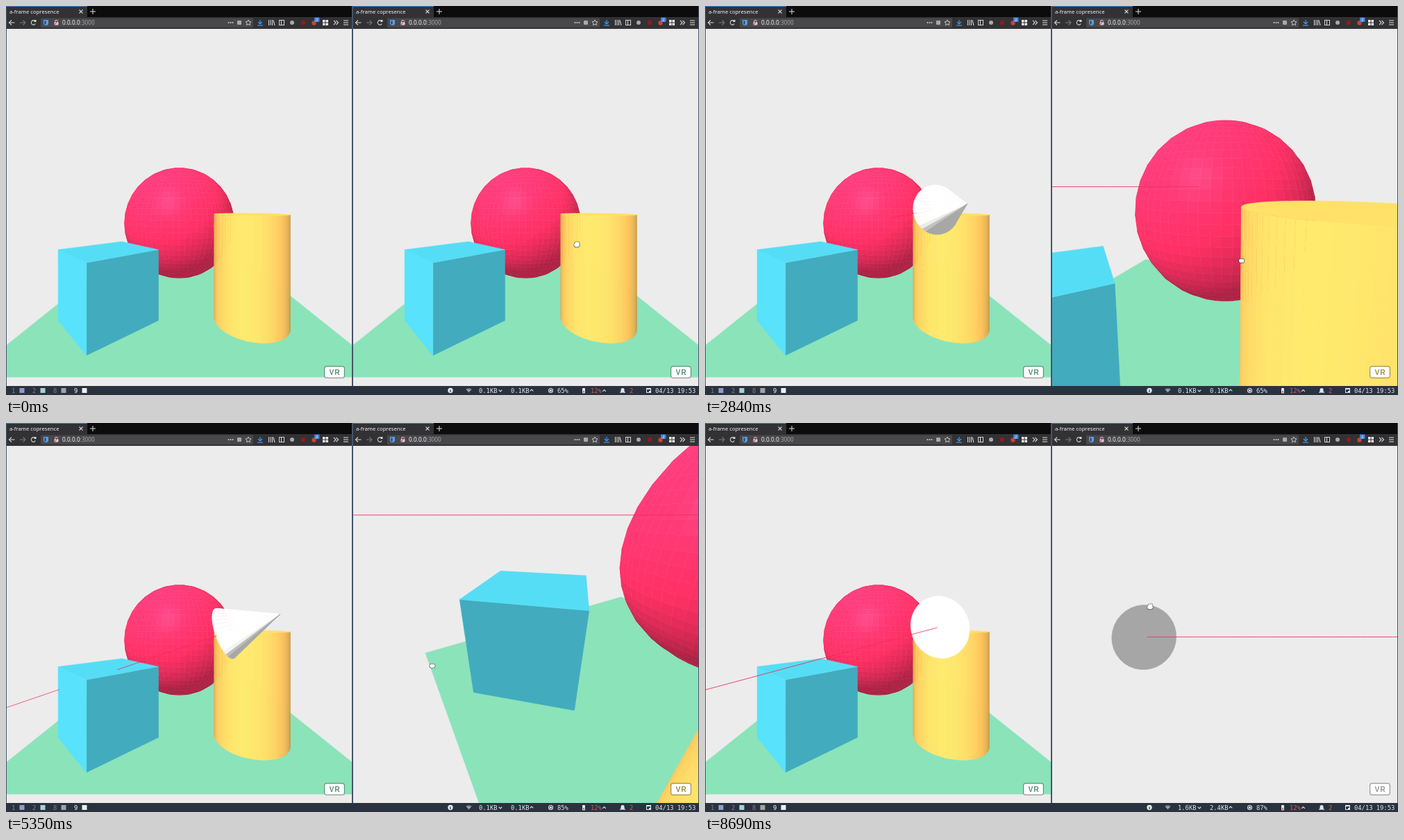
Write an HTML page with a canvas that moves like this. It is 998x561 px and loops after 9.57 s.

```html
<!DOCTYPE html>
<html lang="en">
<head>
<meta charset="utf-8">
<title>a-frame copresence</title>
<style>
html, body { margin: 0; width: 100%; height: 100%; overflow: hidden; background: #0c0c0d; }
canvas { display: block; }
</style>
</head>
<body>
<canvas id="stage" width="998" height="561"></canvas>
<script>
const LOOP = 9570, FOCAL = 306.4, NEAR = 0.05, MID_Y = 290.1, EYE_Y = 1.6;
const stage = document.getElementById('stage').getContext('2d');
let g = stage;

// ---------- vectors ----------
const add = (a, b, k = 1) => a.map((v, i) => v + b[i] * k);
const mix = (a, b, k) => a.map((v, i) => v + (b[i] - v) * k);
const dot = (a, b) => a[0] * b[0] + a[1] * b[1] + a[2] * b[2];
const cross = (a, b) => [a[1] * b[2] - a[2] * b[1], a[2] * b[0] - a[0] * b[2], a[0] * b[1] - a[1] * b[0]];
const unit = a => { const n = Math.hypot(...a); return a.map(v => v / n); };
const rad = d => d * Math.PI / 180;
const LIGHT = unit([-0.5, 1, 1]), UP = [0, 1, 0], TURN = Math.PI * 2;

// ---------- camera ----------
function camera(midX, x, z, yaw, pitch) {
  return { midX, eye: [x, EYE_Y, z], s: Math.sin(rad(yaw)), c: Math.cos(rad(yaw)),
           sp: Math.sin(rad(pitch)), cp: Math.cos(rad(pitch)) };
}
function toCamera(cam, p) {
  const [x, y, z] = add(p, cam.eye, -1), ahead = -x * cam.s - z * cam.c;
  return [x * cam.c - z * cam.s, y * cam.cp + ahead * cam.sp, ahead * cam.cp - y * cam.sp];
}
const toScreen = (cam, [x, y, z]) => [cam.midX + FOCAL * x / z, MID_Y - FOCAL * y / z];

function clipNear(pts) {
  const out = [];
  pts.forEach((a, i) => {
    const b = pts[(i + 1) % pts.length];
    if (a[2] >= NEAR) out.push(a);
    if ((a[2] >= NEAR) !== (b[2] >= NEAR)) out.push(mix(a, b, (NEAR - a[2]) / (b[2] - a[2])));
  });
  return out;
}
function face(cam, pts, normal, { rgb, diffuse = 0.6, gloss = 0 }) {
  const view = add(cam.eye, pts[0], -1);
  if (dot(view, normal) <= 0) return;
  const shape = clipNear(pts.map(p => toCamera(cam, p)));
  if (shape.length < 3) return;
  const lit = 0.733 + diffuse * Math.max(0, dot(normal, LIGHT));
  const shine = gloss && gloss * Math.max(0, dot(normal, unit(add(LIGHT, unit(view))))) ** 40;
  g.fillStyle = g.strokeStyle = `rgb(${rgb.map(v => Math.min(255, Math.round(v * lit + shine)))})`;
  g.lineWidth = 0.5;
  g.beginPath();
  shape.forEach(p => g.lineTo(...toScreen(cam, p)));
  g.closePath();
  g.fill();
  g.stroke();
}

// ---------- scene ----------
const GREEN = { rgb: [123, 200, 164] }, TEAL = { rgb: [76, 195, 217] }, AMBER = { rgb: [255, 198, 93] };
const PINK = { rgb: [239, 45, 94], gloss: 18 }, WHITE = { rgb: [226, 226, 228], diffuse: 1.6 };
const BALL = [0, 1.25, -5], BALL_R = 1.25;
const around = (n, fn) => Array.from({ length: n }, (_, i) => fn(i / n * TURN, (i + 1) / n * TURN));

// A coarse globe of 36 by 18 cells; each cell is split in four for smoother shading.
const globe = (i, j) => {
  const u = rad(i * 10), v = rad(j * 10);
  return [Math.sin(v) * Math.cos(u), Math.cos(v), Math.sin(v) * Math.sin(u)];
};
function facet(u, v) {
  const i = Math.floor(u), j = Math.floor(v);
  return mix(mix(globe(i, j), globe(i + 1, j), u - i), mix(globe(i, j + 1), globe(i + 1, j + 1), u - i), v - j);
}
const ballFaces = [];
for (let v = 0; v < 18; v += 0.5)
  for (let u = 0; u < 36; u += 0.5) {
    const quad = [facet(u, v), facet(u + 0.5, v), facet(u + 0.5, v + 0.5), facet(u, v + 0.5)];
    ballFaces.push([quad.map(p => add(BALL, p, BALL_R)), globe(u + 0.25, v + 0.25)]);
  }

// Upright prism with a flat lid: a box for four sides, a cylinder for many.
function prism(cam, sides, x, z, r, height, paint) {
  const rim = (a, y) => [x + r * Math.cos(a), y, z + r * Math.sin(a)];
  around(sides, (a, b) => {
    const m = (a + b) / 2;
    face(cam, [rim(a, height), rim(b, height), rim(b, 0), rim(a, 0)], [Math.cos(m), 0, Math.sin(m)], paint);
  });
  face(cam, around(sides, a => rim(a, height)), UP, paint);
}
function drawScene(cam) {
  g.fillStyle = '#ececec';
  g.fillRect(cam.midX - 250, 33, 500, 515);
  face(cam, [[-2, 0, -2], [2, 0, -2], [2, 0, -6], [-2, 0, -6]], UP, GREEN);
  ballFaces.forEach(([quad, normal]) => face(cam, quad, normal, PINK));
  prism(cam, 4, -1, -3, Math.SQRT1_2, 1, TEAL);
  prism(cam, 90, 1, -3, 0.5, 1.5, AMBER);
}

// ---------- avatar: a cone whose base faces the gaze, plus a laser ----------
const avatar = (x, z, dir) => ({ pos: [x, EYE_Y, z], dir: unit(dir) });

function drawCone(cam, { pos, dir }) {
  const e1 = unit(cross(dir, UP)), e2 = cross(e1, dir);
  const base = add(pos, dir, 0.25), apex = add(pos, dir, -0.25);
  const spoke = a => add(e1.map(v => v * Math.cos(a)), e2, Math.sin(a));
  const rim = a => add(base, spoke(a), 0.25);
  around(36, (a, b) => face(cam, [apex, rim(a), rim(b)], unit(add(spoke((a + b) / 2), dir, -0.5)), WHITE));
  face(cam, around(36, rim), dir, WHITE);
}
function insideSolid(p, cone) {
  const [x, y, z] = p, dz = z + 3;
  if (y < 0) return Math.abs(x) < 2 && z < -2 && z > -6;
  if (y < 1 && Math.abs(x + 1) + Math.abs(dz) < Math.SQRT1_2) return true;
  if (y < 1.5 && Math.hypot(x - 1, dz) < 0.5) return true;
  if (Math.hypot(...add(p, BALL, -1)) < BALL_R) return true;
  const w = add(p, add(cone.pos, cone.dir, -0.25), -1), s = dot(w, cone.dir);
  return s > 0 && s < 0.495 && dot(w, w) - s * s < s * s / 4;
}
function hidden(cam, p, cone) {
  for (let i = 1; i <= 60; i++) if (insideSolid(mix(cam.eye, p, i / 60), cone)) return true;
  return false;
}
function drawLaser(cam, user) {
  g.strokeStyle = '#ec2f56';
  g.lineWidth = 0.9;
  g.beginPath();
  let last = null;
  for (let i = 0; i <= 400; i++) {
    const p = add(user.pos, user.dir, 0.25 + 5.25 * i / 400), c = toCamera(cam, p);
    const q = c[2] > NEAR && toScreen(cam, c);
    const now = q && Math.abs(q[0] - cam.midX) < 600 && !hidden(cam, p, user) ? q : null;
    if (last && now) { g.moveTo(...last); g.lineTo(...now); }
    last = now;
  }
  g.stroke();
}

// ---------- motion ----------
// Distance covered while a key is held: speed eases in and out with a 50 ms time constant.
const ramp = u => u > 0 ? u - 0.05 * (1 - Math.exp(-u / 0.05)) : 0;
const walk = (t, press, hold) => 3.25 * (ramp((t - press) / 1000) - ramp((t - press) / 1000 - hold));
const place = t => [walk(t, 1365, 0.196), -walk(t, 890, 0.404) - walk(t, 2010, 0.178)];

// Looking around is a steady drag between a few poses, with rests in between.
const RESTS = [[4060, 4230], [4850, 5020], [6430, 6760], [7640, 7720]];
const dragTime = t => RESTS.reduce((sum, [from, to]) => sum - Math.max(0, Math.min(t, to) - from), t);
const POSES = [
  { at: 2620, pose: [0, 0, 0, 822, 344] },          // yaw, pitch, avatar slope, cursor
  { at: 3500, pose: [46.7, 21.85, -0.376, 626, 436] },
  { at: 4390, pose: [64.4, 38, -0.505, 509, 467] },
  { at: 5350, pose: [57.9, 27.2, -0.351, 614, 350] },
  { at: 7180, pose: [151.1, 3.72, 0.053, 582, 262] },
  { at: 8070, pose: [138.8, -3.45, -0.109, 641, 265] }
];
function lookAt(t) {
  const next = POSES.findIndex(p => p.at > t);
  if (next < 1) return POSES.at(next).pose;
  const a = POSES[next - 1], b = POSES[next], from = dragTime(a.at);
  return mix(a.pose, b.pose, (dragTime(t) - from) / (dragTime(b.at) - from));
}

// ---------- browser and desktop ----------
const SANS = '"Noto Sans", "Open Sans", sans-serif', MONO = '8.8px "DejaVu Sans Mono", monospace';

function rect(color, x, y, w, h, r = 0) {
  g.fillStyle = color;
  g.beginPath();
  g.roundRect(x, y, w, h, r);
  g.fill();
}
const disc = (color, x, y, r) => rect(color, x - r, y - r, 2 * r, 2 * r, r);
function frame(color, x, y, w, h) {
  g.strokeStyle = color;
  g.lineWidth = 1;
  g.strokeRect(x, y, w, h);
}
function line(color, ...xy) {
  g.strokeStyle = color;
  g.lineWidth = 1.1;
  g.beginPath();
  for (let i = 0; i < xy.length; i += 2) g.lineTo(xy[i], xy[i + 1]);
  g.stroke();
}
function ring(color, x, y, r, from = 0, to = TURN) {
  g.strokeStyle = color;
  g.lineWidth = 1.1;
  g.beginPath();
  g.arc(x, y, r, from, to);
  g.stroke();
}
// Arrow head with its tip at x, y, pointing along dx, dy; the tail is optional.
function arrow(color, x, y, dx, dy, size, tail = 0) {
  line(color, x - (dx + dy) * size, y - (dx + dy) * size, x, y, x - (dx - dy) * size, y + (dx - dy) * size);
  if (tail) line(color, x, y, x - dx * tail, y - dy * tail);
}
function text(str, x, y, color, font) {
  g.font = font;
  g.fillStyle = color;
  g.fillText(str, x, y);
  return x + g.measureText(str).width;
}
function star(color, x, y, r) {
  g.beginPath();
  around(10, a => {
    const k = Math.round(a / TURN * 10) % 2 ? r / 2 : r;
    g.lineTo(x + k * Math.sin(a), y - k * Math.cos(a));
  });
  g.closePath();
  g.strokeStyle = color;
  g.lineWidth = 0.9;
  g.stroke();
}

function drawBrowser(x) {
  const ink = '#d2d2d4', dim = '#77777a', edge = '#465468', mid = 24;
  g.save();
  g.translate(x, 0);
  rect('#0c0c0d', 0, 0, 499, 16);
  rect('#323236', 0, 0, 117, 16);
  rect('#3f7fc0', 0, 0, 117, 1);
  text('a-frame copresence', 5, 11, '#f4f4f5', '7.7px ' + SANS);
  line(ink, 105.5, 5.5, 110.5, 10.5);
  line(ink, 110.5, 5.5, 105.5, 10.5);
  line(ink, 121, 8, 129, 8);
  line(ink, 125, 4, 125, 12);

  rect('#323234', 0, 16, 499, 17);
  rect('#48484b', 50, 17.5, 306, 13.5, 1);
  arrow(ink, 4.5, mid, -1, 0, 3.5, 8);
  arrow(dim, 28, mid, 1, 0, 3.5, 8);
  ring(ink, 39.5, mid, 3.2, 0.5, 5.6);
  rect(ink, 40.5, 20, 3, 3);
  rect('#5a9ee8', 54, 20, 7, 8, [1, 1, 4, 4]);
  rect('#353f50', 55.5, 21.5, 2, 5);
  rect(ink, 69.5, 23, 6, 4.5, 1);
  ring(ink, 72.5, 22.5, 2, Math.PI, TURN);
  line('#e0365a', 69, 28, 76, 20);
  const port = text('0.0.0.0', 81, 27, '#f4f4f5', '8.3px ' + SANS);
  text(':3000', port, 27, '#a6a6aa', '8.3px ' + SANS);

  for (let i = 0; i < 3; i++) {
    disc(ink, 320.5 + 3 * i, mid, 1);
    line(ink, 378.5 + 2.5 * i, 20, 378.5 + 2.5 * i, 28);
    line(ink, 486, 21 + 3 * i, 493, 21 + 3 * i);
  }
  rect('#a9a9ac', 333, 21, 6, 6, 1);
  star(ink, 349, 24.2, 4.2);
  arrow('#45a1ff', 366, 26, 0, 1, 3, 6);
  line('#45a1ff', 362, 28, 370, 28);
  line(ink, 385, 20.5, 387, 28);
  frame(ink, 393.5, 20.5, 7, 7);
  line(ink, 396.5, 20.5, 396.5, 27.5);
  disc('#a9a9ac', 412, mid, 3);
  disc('#96181c', 428, mid, 3.2);
  disc('#d0402f', 443.5, 24.5, 3.2);
  rect('#3f86e0', 444, 16.5, 7.5, 6.5, 1);
  text('2', 446, 22, '#fff', '6px ' + SANS);
  for (let i = 0; i < 4; i++) rect('#f0f0f0', 456 + 4.5 * (i % 2), 20 + 4.5 * (i >> 1), 3.5, 3.5);
  arrow(ink, 475, mid, 1, 0, 3);
  arrow(ink, 478.5, mid, 1, 0, 3);
  rect(edge, 0, 0, 1, 548);
  rect(edge, 498, 0, 1, 548);
  g.restore();
}

function drawStatus(t) {
  const ink = '#e4e6ea', red = '#c9605c', bar = '#2b323f', base = 558, busy = t >= 8690;
  const say = (str, x, color = ink) => text(str, x, base, color, MONO);
  rect(bar, 0, 548, 998, 13);
  ['#8c9fc8', '#a5d3d6', '#a3a3a3', '#eef0f0'].forEach((color, i) => {
    say('1289'[i], 8 + 30 * i, i === 3 ? '#fff' : '#7c8490');
    rect(color, 19.5 + 30 * i, 551, 7, 7);
  });
  disc(ink, 640, 554.5, 3.7);
  rect(bar, 639.4, 553.5, 1.2, 3.5);
  for (let r = 1.5; r < 6; r += 2) ring(ink, 666.5, 557.5, r, -2.3, -0.84);
  say(busy ? '1.6KB' : '0.1KB', 681);
  arrow(ink, 712, 556, 0, 1, 2.3);
  say(busy ? '2.4KB' : '0.1KB', 727);
  arrow(ink, 757, 553, 0, -1, 2.3);
  ring(ink, 784.5, 554.5, 3);
  disc(ink, 784.5, 554.5, 1.6);
  say(t < 3830 ? '65%' : t < 8500 ? '85%' : '87%', 794);
  rect(ink, 830, 551, 4, 7.5, 0.7);
  rect(red, 831, 555, 2, 2.5);
  say('12%', 842, red);
  arrow(ink, 861.5, 553.5, 0, -1, 2.3);
  rect(ink, 885.5, 551, 5, 6, [2.5, 2.5, 0, 0]);
  rect(ink, 884, 556.5, 8, 1.2);
  say('2', 898, red);
  frame(ink, 922.5, 551.5, 6, 6);
  rect(ink, 922.5, 551, 6, 2);
  rect(ink, 926, 555, 3, 3);
  say('04/13 19:53', 935);
}

function drawCursor(x, y, gripping) {
  g.beginPath();
  if (!gripping) for (let i = 0; i < 3; i++) g.roundRect(x - 2.5 + 2 * i, y - 4, 2, 5, 1);
  g.roundRect(x - 3.8, y - 2.4, 7.6, gripping ? 5.4 : 6, 2.4);
  g.strokeStyle = '#3c4448';
  g.lineWidth = 1.2;
  g.stroke();
  g.fillStyle = '#fff';
  g.fill();
}

function layer(w, h, paint) {
  const c = document.createElement('canvas');
  c.width = w;
  c.height = h;
  g = c.getContext('2d');
  paint();
  g = stage;
  return c;
}
const leftCam = camera(249.5, 0, 0, 0, 0);
const still = layer(998, 561, () => { drawScene(leftCam); drawBrowser(0); drawBrowser(499); });
// The letters and rim of the button let the darkened scene show through.
const vrButton = layer(32, 20, () => {
  rect('#fff', 2.2, 2.2, 27.6, 15.6, 2.5);
  g.globalCompositeOperation = 'destination-out';
  g.letterSpacing = '1px';
  text('VR', 8.5, 13.7, '#000', 'bold 10.3px "Liberation Sans", Arial, sans-serif');
  g.globalCompositeOperation = 'destination-over';
  rect('rgba(0,0,0,.36)', 1, 1, 30, 18, 4);
});

// ---------- picture at a given time ----------
const host = avatar(0, 0, [0, 0, -1]);
const NETWORK_LAG = 165, GUEST_JOINS = 1440;

function inPane(x, paint) {
  g.save();
  g.beginPath();
  g.rect(x, 33, 497, 515);
  g.clip();
  paint();
  g.restore();
}
function drawUser(cam, user) {
  drawCone(cam, user);
  drawLaser(cam, user);
}
function draw(t) {
  const [yaw, pitch, slope, cursorX, cursorY] = lookAt(t);
  g.drawImage(still, 0, 0);
  if (t > GUEST_JOINS) inPane(1, () => {
    const gaze = [-Math.sin(rad(yaw)), slope, -Math.cos(rad(yaw))];
    drawUser(leftCam, avatar(...place(t - NETWORK_LAG), gaze));
  });
  inPane(500, () => {
    const cam = camera(748.5, ...place(t), yaw, pitch);
    drawScene(cam);
    drawUser(cam, host);
  });
  g.drawImage(vrButton, 457, 518);
  g.drawImage(vrButton, 956, 518);
  drawStatus(t);
  drawCursor(cursorX, cursorY, t > POSES[0].at && t < 8330);
}

const start = performance.now();
(function tick() {
  draw((performance.now() - start) % LOOP);
  requestAnimationFrame(tick);
})();
</script>
</body>
</html>
```
